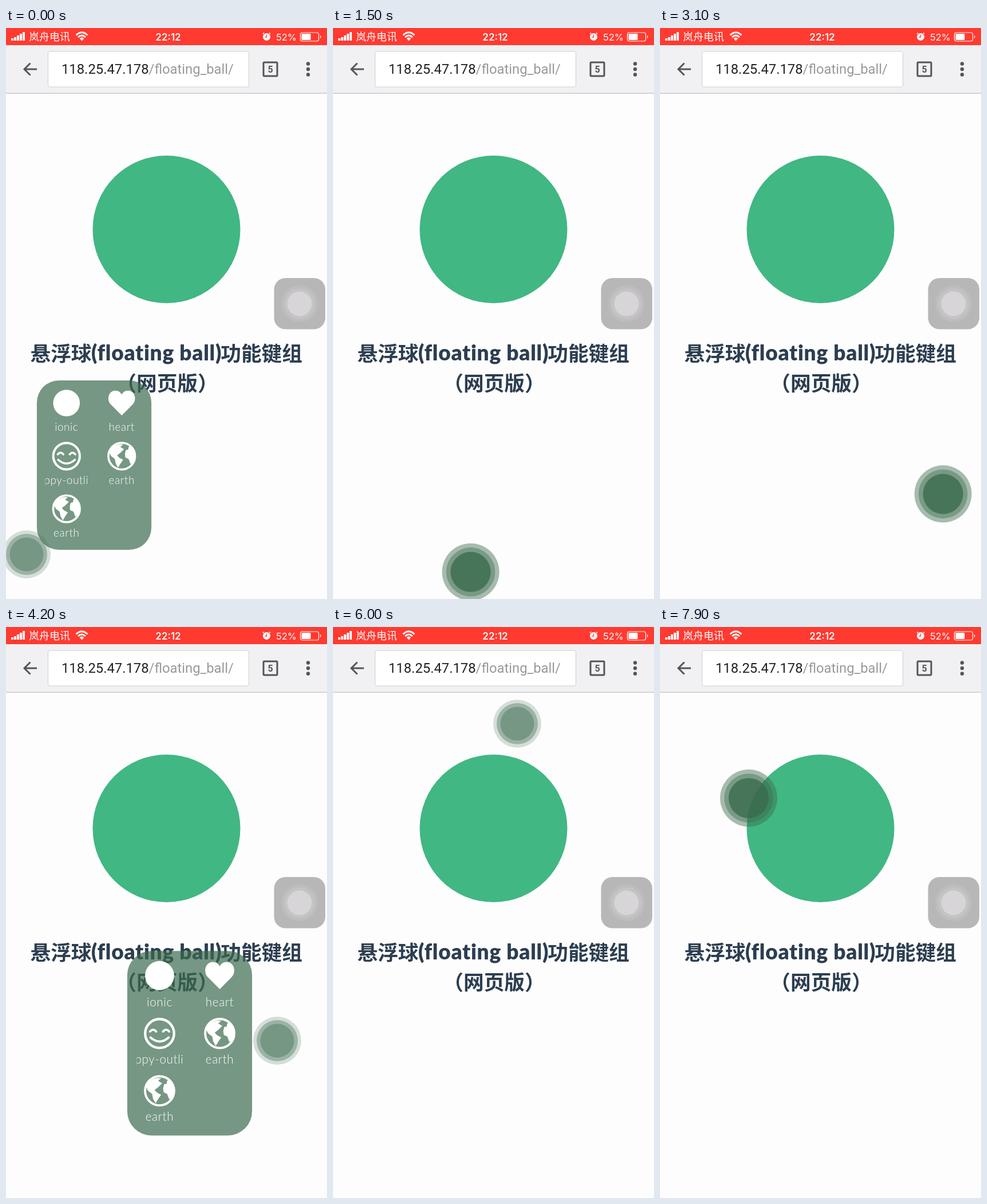
These frames come from a looping animation (561x998 px, 8000 ms). An HTML page:

```html
<!DOCTYPE html>
<html lang="zh-CN">
<head>
<meta charset="utf-8">
<title>Floating ball</title>
<style>
  html, body { margin: 0; width: 100%; height: 100%; overflow: hidden; background: #fefdfe; }
  svg { display: block; width: 100vw; height: 100vh; }
  .cjk { font-family: "Noto Sans CJK SC", "Noto Sans CJK", sans-serif; }
  .title { font-size: 35.7px; font-weight: 700; fill: #2c3e50; }
  .latin { font-family: Lato, sans-serif; font-weight: 900; font-size: 37px; letter-spacing: .75px; font-variant-ligatures: none; }
  .status { font: 16.5px Inter, sans-serif; fill: #fff; }
  .url { font: 23.8px Roboto, sans-serif; }
  .line { fill: none; stroke: #555; stroke-width: 3; }
  .white { fill: none; stroke: #fff; }
  .label { font: 300 23.5px Lato, sans-serif; fill: #fff; text-anchor: middle; letter-spacing: .7px; }
  #ball { fill: #3a6b4d; }
  .outer { fill-opacity: .21; }
  .mid { fill-opacity: .37; }
  .core { fill-opacity: .39; }
  .pressed .outer { fill-opacity: .45; }
  .pressed .mid { fill-opacity: .42; }
  .pressed .core { fill-opacity: .78; }
</style>
</head>
<body>
<svg viewBox="0 0 561 998" preserveAspectRatio="none">
  <defs>
    <clipPath id="cell"><rect x="-46" y="-30" width="92" height="50"/></clipPath>
    <g id="earth">
      <circle r="29" class="white" stroke-width="4.5"/>
      <path fill="#fff" d="M-28-10C-20-22-8-28 3-25L-3-20 5-15-3-7-10-2-6 3 3 8-2 15-8 25-13 16-15 6-23 0Z
        M9-13L14-14 15-20 20-22 28-9 29 5 24 14 19 17 15 6 8 3 7-5Z"/>
    </g>
  </defs>

  <!-- status bar -->
  <rect width="561" height="30" fill="#ff3a30"/>
  <path fill="#fff" d="M9 18h4v4h-4zM14 16h4v6h-4zM19 13h4v9h-4zM24 10h4v12h-4zM29 7h4v15h-4z"/>
  <text x="40" y="22" class="cjk" font-size="18" fill="#fff">岚舟电讯</text>
  <g class="white" stroke-width="2.8">
    <path d="M122.500 12.500Q132.500 3 142.500 12.500M126 16Q132.500 10 139 16"/>
    <path d="M128.500 18L132.500 22.500 136.500 18Q132.500 15 128.500 18Z" fill="#fff" stroke="none"/>
  </g>
  <text x="283.500" y="21.500" class="status" text-anchor="middle" style="font-size:17px;font-weight:600">22:12</text>
  <circle cx="455.500" cy="15.500" r="6.500" fill="#fff"/>
  <path d="M449 10.500l2-2M462 10.500l-2-2" class="white" stroke-width="1.500"/>
  <path d="M455.500 11.500v4.500h-3" fill="none" stroke="#ff3a30" stroke-width="1.300"/>
  <text x="472" y="21.500" class="status">52%</text>
  <rect x="514.500" y="8" width="32" height="15" rx="3.500" class="white" stroke-width="1.200"/>
  <rect x="516.500" y="10" width="16" height="11" rx="1.500" fill="#fff"/>
  <path d="M549 12.500q3 3 0 6z" fill="#fff"/>

  <!-- browser bar -->
  <rect y="30" width="561" height="84" fill="#f1f0f2"/>
  <rect y="113.500" width="561" height="1.300" fill="#c4c3c5"/>
  <path class="line" d="M54 72H32M42.500 61.500L32 72 42.500 82.500"/>
  <rect x="73.500" y="41" width="351" height="62" rx="3" fill="#fff" stroke="#cfced0"/>
  <text x="97" y="79.500" class="url" fill="#222">118.25.47.178<tspan fill="#999">/floating_ball/</tspan></text>
  <rect x="450" y="60" width="24" height="24" rx="1.500" class="line"/>
  <text x="462" y="77.500" text-anchor="middle" font-family="Roboto, sans-serif" font-weight="700" font-size="16" fill="#555">5</text>
  <g fill="#555"><circle cx="528" cy="62.500" r="3.200"/><circle cx="528" cy="72" r="3.200"/><circle cx="528" cy="81.500" r="3.200"/></g>

  <!-- page -->
  <circle cx="280.500" cy="352" r="129" fill="#41b783"/>
  <g class="cjk title">
    <text x="42.500" y="582">悬浮球</text>
    <text x="263" y="581" class="latin" text-anchor="middle">(floating ball)</text>
    <text x="518" y="582" text-anchor="end">功能键组</text>
    <text x="281.500" y="634" text-anchor="middle">（网页版）</text>
  </g>

  <g id="menu" visibility="hidden">
    <rect x="-124.500" y="-184" width="249" height="368" rx="48" fill="#3a6b4d" fill-opacity=".69"/>
    <g transform="translate(-60 -135)">
      <circle r="29" fill="#fff"/>
      <text y="61" class="label">ionic</text>
    </g>
    <g transform="translate(60 -135)">
      <path fill="#fff" d="M0 27L-24 3C-34-8-28-27-14-27-7-27-2-23 0-18 2-23 7-27 14-27 28-27 34-8 24 3Z"/>
      <text y="61" class="label">heart</text>
    </g>
    <g transform="translate(-60 -19.500)">
      <circle r="28.800" class="white" stroke-width="5"/>
      <path class="white" stroke-width="4.500" stroke-linecap="round" d="M-19-4q6-7 12 0M7-4q6-7 12 0M-18 8Q0 24 18 8"/>
      <g transform="translate(0 60)" clip-path="url(#cell)"><text class="label">happy-outline</text></g>
    </g>
    <g transform="translate(60 -19.500)"><use href="#earth"/><text y="60" class="label">earth</text></g>
    <g transform="translate(-60 95)"><use href="#earth"/><text y="60" class="label">earth</text></g>
  </g>

  <g id="ball">
    <circle class="outer" r="42"/><circle class="mid" r="36"/><circle class="core" r="29.500"/>
  </g>

  <!-- system touch button -->
  <rect x="468.500" y="437" width="89.500" height="89.500" rx="20" fill="#b8b7b8"/>
  <g transform="translate(513 482)">
    <circle r="32" fill="#bebdbe"/><circle r="27" fill="#c5c4c5"/><circle r="21.500" fill="#d7d5d7"/>
  </g>
</svg>
<script>
  const LOOP = 8000, STEP = 100;

  // time, x, y
  const path = [
    [0, 36, 920], [500, 36, 920], [700, 28, 925], [1100, 28, 925],
    [1800, 400, 970], [2500, 400, 970], [3000, 505, 860], [3300, 474, 723],
    [4600, 474, 723], [5000, 512, 480], [5400, 322, 169], [6200, 322, 169],
    [6700, 64, 211], [7000, 64, 211], [7300, 82, 224], [7700, 82, 224], [7900, 155, 299]
  ];

  // start, end of each touch
  const touches = [
    [500, 700], [1200, 1800], [2600, 3300], [3600, 3700],
    [4700, 5400], [5800, 6000], [6300, 6700], [7100, 8000]
  ];

  const menus = [
    { x: 154, y: 764, open: 0, close: 500, first: .804 },
    { x: 404, y: 754.5, open: 1900, close: 2600, first: .85 },
    { x: 321, y: 727.5, open: 4200, close: 4700, first: .876 }
  ];

  const ball = document.getElementById('ball');
  const menu = document.getElementById('menu');

  function ballAt(t) {
    const i = path.findIndex(p => p[0] >= t);
    const [t1, x1, y1] = path[i];
    const [t0, x0, y0] = path[Math.max(0, i - 1)];
    const k = t1 > t0 ? (t - t0) / (t1 - t0) : 1;
    return [x0 + (x1 - x0) * k, y0 + (y1 - y0) * k];
  }

  function menuScale(m, t) {
    if (t >= m.close) return 1 - ((t - m.close + STEP) / (3 * STEP)) ** 1.5;
    const left = Math.max(0, 1 - (t - m.open) / (2 * STEP));
    return 1 - (1 - m.first) * left * left;
  }

  function place(el, x, y, scale) {
    el.setAttribute('transform', `translate(${x} ${y}) scale(${scale})`);
  }

  function draw(now) {
    const t = Math.floor(now % LOOP / STEP) * STEP;
    const pressed = touches.some(([a, b]) => t >= a && t < b);
    const [x, y] = ballAt(t);
    place(ball, x, y, pressed ? 1.19 : 1);
    ball.classList.toggle('pressed', pressed);

    const m = menus.find(m => t >= m.open && t < m.close + 2 * STEP);
    menu.setAttribute('visibility', m ? 'visible' : 'hidden');
    if (m) place(menu, m.x, m.y, menuScale(m, t));
  }

  const start = performance.now();
  function tick() {
    draw(performance.now() - start);
    requestAnimationFrame(tick);
  }
  tick();
</script>
</body>
</html>
```
